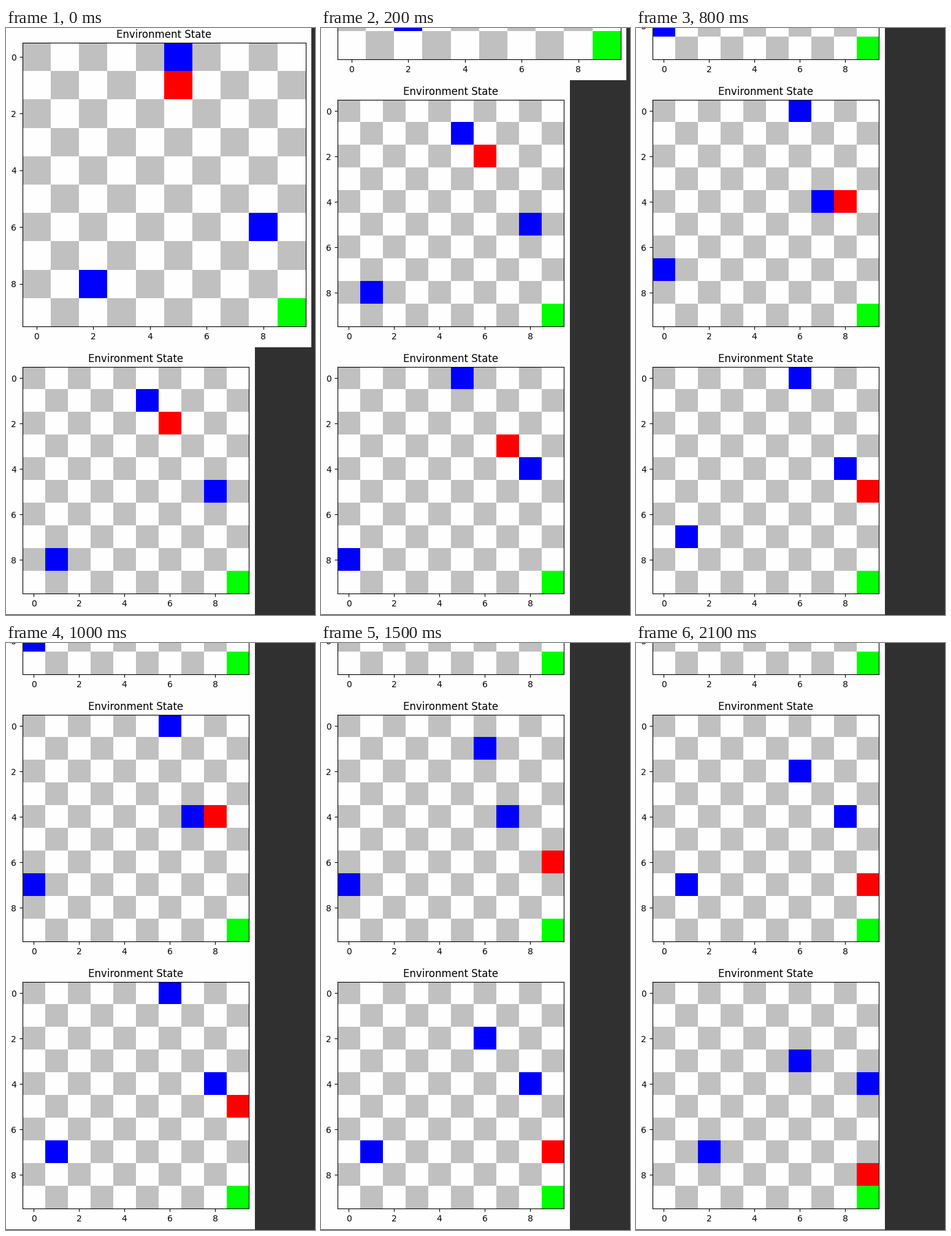
A matplotlib script that plays this animation: 504 by 956 pixels, repeating every 2200 ms.

```python
import numpy as np
import matplotlib.pyplot as plt
from matplotlib.animation import FuncAnimation
from matplotlib.patches import Rectangle

W, H, DPI = 504, 956, 100
FRAMES, INTERVAL = 22, 100
FIRST, PERIOD = 140, 330            # ms of the first new plot, ms between plots
SCROLL = 435                        # height of one notebook output
PAPER, DARK = "#fefefe", "#303030"
GREY, RED, BLUE, GREEN = 192 / 255, (1, 0, 0), (0, 0, 1), (0, 1, 0)

MOVES = {"U": (0, -1), "D": (0, 1), "L": (-1, 0), "R": (1, 0), ".": (0, 0)}
# start cell and random walk of each obstacle
WALKS = [((5, 0), "DUR.DDD"), ((8, 6), "UULRLRR"), ((2, 8), "LLURLRR")]
PLOTS = 1 + len(WALKS[0][1])

plt.rcParams["font.family"] = "DejaVu Sans"
fig = plt.figure(figsize=(W / DPI, H / DPI), dpi=DPI, facecolor=DARK)


def box(x, top, w, h):
    """Pixel box measured from the top left, as figure fractions."""
    return x / W, 1 - (top + h) / H, w / W, h / H


def board(k):
    rows, cols = np.indices((10, 10))
    shade = np.where((rows + cols) % 2, 254 / 255, GREY)
    img = np.repeat(shade[..., None], 3, axis=2)
    img[9, 9] = GREEN
    for start, walk in WALKS:
        x, y = np.sum([start] + [MOVES[m] for m in walk[:k]], axis=0)
        img[y, x] = BLUE
    # the agent heads down the diagonal, then along the right wall
    img[1 + k, min(5 + k, 9)] = RED
    return img


class Panel:
    def __init__(self, k):
        if k == 0:
            self.page, self.plot = (0, 0, 498, 520), (26.8, 24, 462, 462)
        else:
            top = 520 + SCROLL * (k - 1)
            self.page = (0, top, 406, SCROLL)
            self.plot = (26.8, top + 31.86, 369.6, 369.6)
        self.paper = fig.add_artist(
            Rectangle((0, 0), 1, 1, fc=PAPER, lw=0, zorder=-1))
        self.ax = fig.add_axes(box(*self.plot), label=f"step {k}")
        self.ax.imshow(board(k), interpolation="nearest")
        self.ax.set_title("Environment State")
        self.ax.set_xticks(range(0, 10, 2))
        self.ax.set_yticks(range(0, 10, 2))

    def scroll(self, dy):
        x, top, w, h = self.page
        visible = -h < top - dy < H - 1
        self.paper.set_visible(visible)
        self.ax.set_visible(visible)
        self.paper.set_bounds(*box(x, top - dy, w, h))
        x, top, w, h = self.plot
        self.ax.set_position(box(x, top - dy, w, h))


panels = [Panel(k) for k in range(PLOTS)]


def update(frame):
    step = (frame * INTERVAL - FIRST) // PERIOD + 1
    for panel in panels:
        panel.scroll(SCROLL * step)
    return []


anim = FuncAnimation(fig, update, frames=FRAMES, interval=INTERVAL,
                     init_func=lambda: update(0), repeat=True, repeat_delay=0)
plt.show()
```
